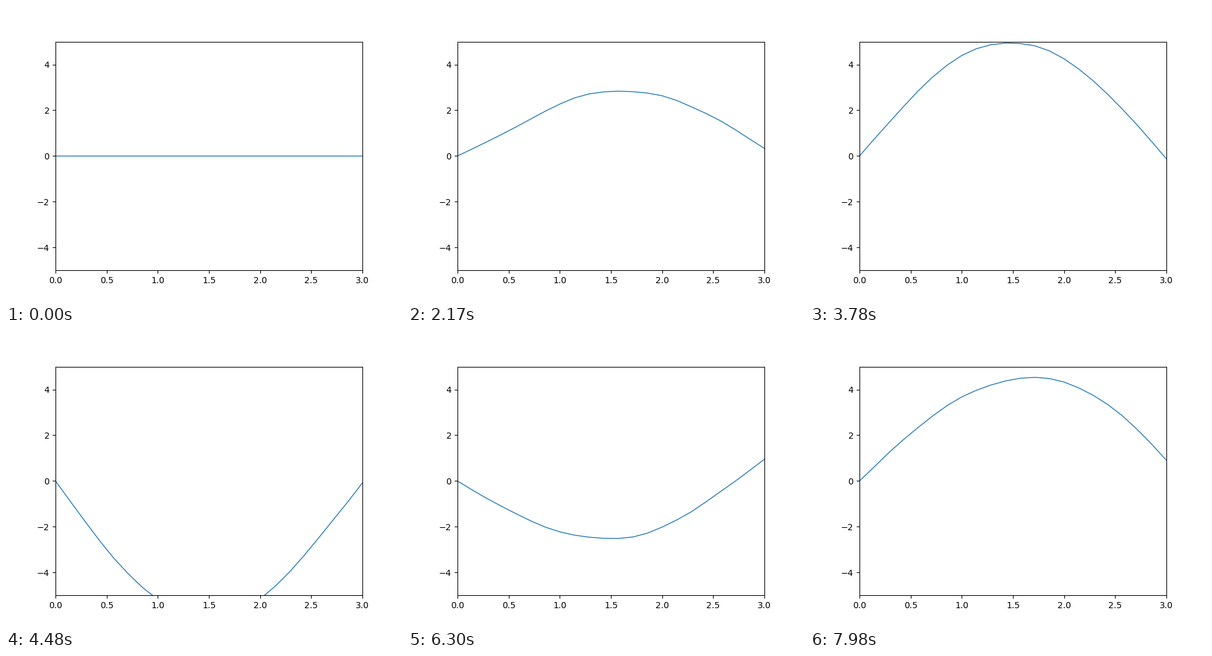
Animation, 640 px wide and 480 px high, one loop 8000 ms. Source, as a matplotlib script:

```python
import math

import matplotlib.pyplot as plt
import numpy as np
from matplotlib.animation import FuncAnimation

LENGTH = 3.0
CELLS = 21
SUBSTEPS = 10          # solver steps per shown step
TRAVEL = 0.28          # distance a wave covers in one shown step
STEP_MS = 70
TICK_MS = 20
LOOP_MS = 8000
STEPS = LOOP_MS // STEP_MS + 1


def simulate():
    """String fixed at the left, shaken at its resonance on the right."""
    courant2 = (TRAVEL / SUBSTEPS * CELLS / LENGTH) ** 2
    phase = math.pi * TRAVEL / LENGTH / SUBSTEPS
    prev = np.zeros(CELLS + 1)
    cur = prev.copy()
    shapes = [cur]
    for n in range(1, (STEPS - 1) * SUBSTEPS + 1):
        new = np.zeros(CELLS + 1)
        bend = cur[2:] - 2 * cur[1:-1] + cur[:-2]
        new[1:-1] = 2 * cur[1:-1] - prev[1:-1] + courant2 * bend
        new[-1] = math.sin(phase * n)
        prev, cur = cur, new
        if n % SUBSTEPS == 0:
            shapes.append(cur)
    return shapes


shapes = simulate()
x = np.linspace(0, LENGTH, CELLS + 1)

fig, ax = plt.subplots(figsize=(6.4, 4.8), dpi=100)
ax.set_xlim(0, LENGTH)
ax.set_ylim(-5, 5)
line, = ax.plot(x, shapes[0], lw=1)


def update(i):
    # half a tick ahead, so each step is in place when its time comes
    step = (i * TICK_MS + TICK_MS // 2) // STEP_MS
    line.set_ydata(shapes[step])
    return line,


anim = FuncAnimation(fig, update, frames=LOOP_MS // TICK_MS,
                     interval=TICK_MS, repeat=True, repeat_delay=0)
plt.show()
```
